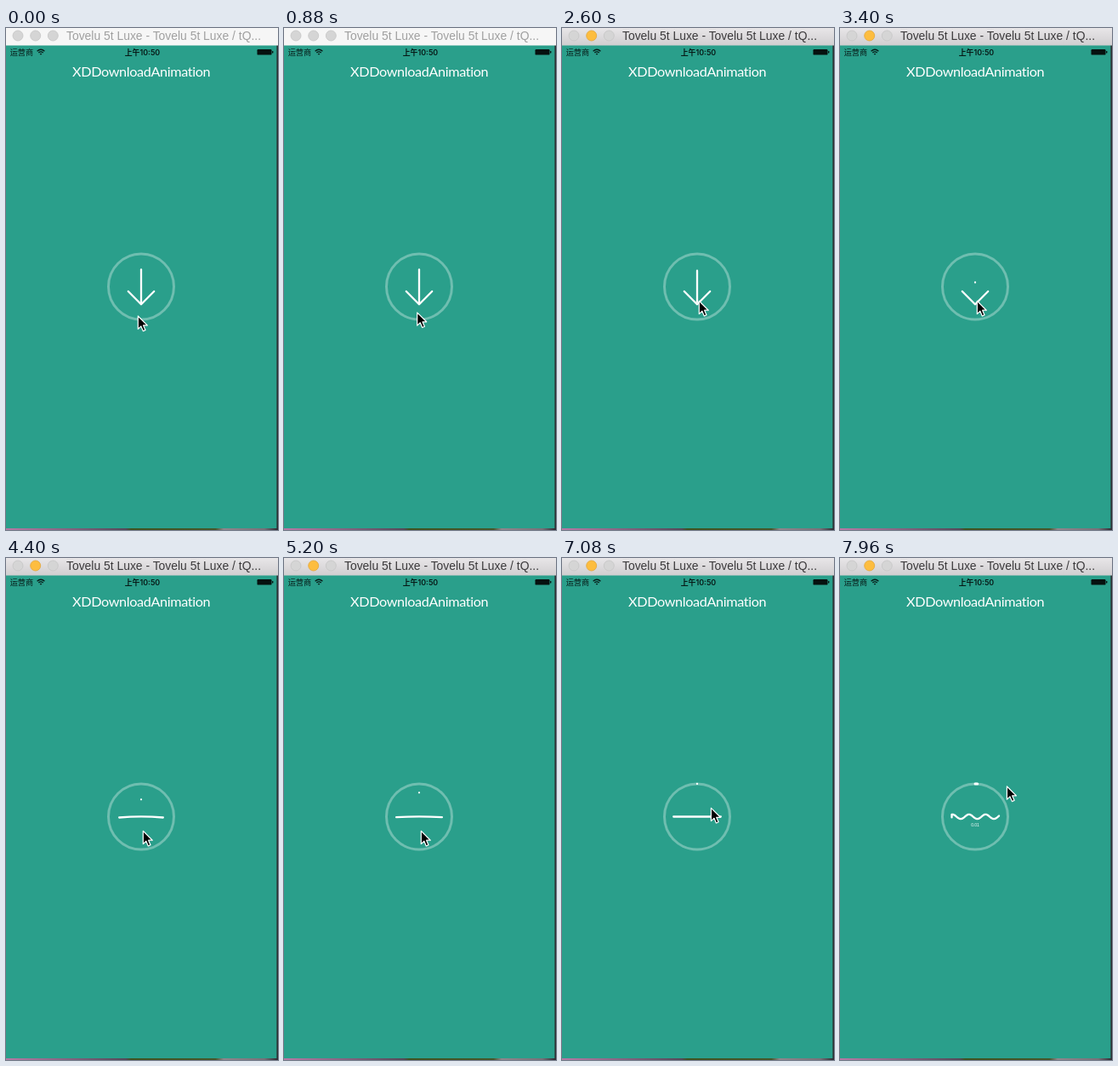
Recreate the animation shown at these times as an HTML page. Size 320x589 px, loop 8000 ms.

```html
<!DOCTYPE html>
<html lang="zh">
<head>
<meta charset="utf-8">
<title>XDDownloadAnimation</title>
<style>
  html, body { margin: 0; width: 100%; height: 100%; overflow: hidden; background: #2a9f8b; }
  svg { display: block; width: 100vw; height: 100vh; }
  .status { font: 400 9.2px "Noto Sans CJK SC", "Noto Sans CJK", sans-serif; fill: #071a17; }
  .clock { font: 600 8.9px Inter, "Noto Sans CJK SC", "Noto Sans CJK", sans-serif; }
  .heading { font: 400 16.2px Lato, sans-serif; letter-spacing: -.35px; fill: #fff; text-anchor: middle;
             font-variant-ligatures: none; }
  .window { font: 13.9px "Liberation Sans", Arial, sans-serif; fill: #a0a0a0; }
  .lamp { fill: #d5d5d5; stroke: #c6c6c6; stroke-width: .8; }
  .active .window { fill: #3c3a3c; }
  .active #bar { fill: url(#barFill); }
  .active #middle { fill: #fdbd3f; stroke: #e2a63a; }
  .ink { fill: none; stroke: #fff; stroke-width: 2.3; stroke-linecap: round; stroke-linejoin: round; }
</style>
</head>
<body>
<svg id="stage" viewBox="0 0 320 589" preserveAspectRatio="none">
  <defs>
    <linearGradient id="barFill" x2="0" y2="1">
      <stop stop-color="#e8e6e8"/><stop offset="1" stop-color="#d0ced0"/>
    </linearGradient>
    <linearGradient id="desk">
      <stop stop-color="#b57aa5"/><stop offset=".2" stop-color="#8a6685"/>
      <stop offset=".44" stop-color="#554859"/><stop offset=".46" stop-color="#3f5220"/>
      <stop offset=".77" stop-color="#46562a"/><stop offset=".8" stop-color="#8f868c"/>
      <stop offset=".95" stop-color="#777078"/><stop offset="1" stop-color="#2b2930"/>
    </linearGradient>
  </defs>

  <rect width="320" height="589" fill="#2a9f8b"/>
  <rect x="318.4" y="20" width="1.6" height="569" fill="#2c3033"/>
  <rect y="587" width="320" height="2" fill="url(#desk)"/>

  <rect id="bar" width="320" height="20.5" fill="#f6f6f6"/>
  <circle class="lamp" cx="14" cy="9" r="6"/>
  <circle class="lamp" id="middle" cx="34.7" cy="9" r="6"/>
  <circle class="lamp" cx="55.3" cy="9" r="6"/>
  <text class="window" x="71" y="14.2">Tovelu 5t Luxe - Tovelu 5t Luxe / tQ...</text>

  <text class="status" x="4.7" y="32">运营商</text>
  <g fill="none" stroke="#071a17" stroke-width="1.3">
    <path d="M36.6 27.2Q41 23.2 45.4 27.2M38.3 29.1Q41 26.8 43.7 29.1"/>
    <path d="M41 31.8L39.7 30.3Q41 29.4 42.3 30.3Z" fill="#071a17" stroke="none"/>
  </g>
  <text class="status clock" x="160.5" y="32" text-anchor="middle">上午10:50</text>
  <rect x="295.5" y="25" width="17" height="6.6" rx="1.2" fill="#06110f"/>
  <rect x="313" y="27" width="1.4" height="2.6" rx=".6" fill="#06110f"/>

  <text class="heading" x="159.2" y="57.2">XDDownloadAnimation</text>

  <circle cx="159" cy="303.5" r="38.5" fill="none" stroke="#fff" stroke-opacity=".32" stroke-width="3"/>
  <path id="arc" class="ink" style="stroke-width:3"/>
  <path id="shaft" class="ink"/>
  <path id="head" class="ink"/>
  <text id="label" x="159" y="315.2" text-anchor="middle" fill="#fff"
        font-size="5" font-family="Liberation Sans, Arial, sans-serif"></text>
  <path id="cursor" d="M0 0V15.2L3.6 11.9L6 17.6L8.7 16.4L6.3 10.9H11Z"
        fill="#000" stroke="#fff" stroke-width="1.2" stroke-linejoin="round"/>
</svg>
<script>
  const LOOP = 8000, CX = 159, CY = 303.5, RADIUS = 38.5;
  const FOCUS = 2360, WAVE = 7280, PROGRESS = 7560;
  const $ = id => document.getElementById(id);

  // Eased interpolation through alternating times and values.
  const smooth = u => u * u * (3 - 2 * u);
  const linear = u => u;
  function track(t, keys, ease = smooth) {
    if (t <= keys[0][0]) return keys[0][1];
    for (let i = 1; i < keys.length; i++) {
      const [t0, v0] = keys[i - 1], [t1, v1] = keys[i];
      if (t <= t1) return v0 + (v1 - v0) * ease((t - t0) / (t1 - t0));
    }
    return keys[keys.length - 1][1];
  }

  function wavePath(t) {
    const height = track(t, [[WAVE, 0], [WAVE + 320, 2.7]]);
    const crest = 142 + (t - 7960) * .03;
    let d = `M131.5 ${CY + height / 3}`;
    for (let x = 131.5; x <= 187; x += 1.5) {
      const y = CY + height * Math.cos((x - crest) * 2 * Math.PI / 19.5);
      d += `L${x} ${y.toFixed(2)}`;
    }
    return d;
  }

  function headPath(t) {
    if (t >= WAVE) return wavePath(t);
    const half = track(t, [[3400, 15.2], [4400, 25.8], [5920, 27.8]]);
    const side = track(t, [[3400, 309], [4400, 304.5], [5920, 303.8], [7080, CY]]);
    const tip = track(t, [[3400, 324.3], [4400, 303.4], [5920, 303.3], [7080, CY]]);
    if (t < 4100) return `M${CX - half} ${side}L${CX} ${tip}L${CX + half} ${side}`;
    return `M${CX - half} ${side}Q${CX} ${2 * tip - side} ${CX + half} ${side}`;
  }

  function draw(t) {
    $('stage').classList.toggle('active', t >= FOCUS);

    const rise = [[3400, 298.5], [4400, 283.3], [5920, 268.2], [7080, 265]];
    const top = t < 3400 ? track(t, [[2440, 283.5], [3360, 298.5]]) : track(t, rise, linear);
    const bottom = t < 3400 ? track(t, [[2440, 323.5], [3360, 298.5]]) : top;
    $('shaft').setAttribute('d', t < PROGRESS ? `M${CX} ${top}L${CX} ${bottom + .01}` : '');
    $('head').setAttribute('d', headPath(t));

    const progress = track(t, [[PROGRESS, 0], [7960, .011]], linear);
    const angle = progress * 2 * Math.PI;
    const x = CX + RADIUS * Math.sin(angle), y = CY - RADIUS * Math.cos(angle);
    $('arc').setAttribute('d', t < PROGRESS ? '' :
      `M${CX} ${CY - RADIUS}A${RADIUS} ${RADIUS} 0 0 1 ${x + .01} ${y}`);
    $('label').textContent = t < PROGRESS ? '' : progress.toFixed(2);

    const px = track(t, [[600, 155.3], [1500, 161.3], [6240, 161.3], [7080, 175.4], [7960, 196.4]]);
    const py = track(t, [[600, 338], [1500, 320.3], [6240, 320.3], [7080, 293.4], [7960, 268]]);
    $('cursor').setAttribute('transform', `translate(${px} ${py})`);
  }

  function tick() {
    draw(performance.now() % LOOP);
    requestAnimationFrame(tick);
  }
  tick();
</script>
</body>
</html>
```
